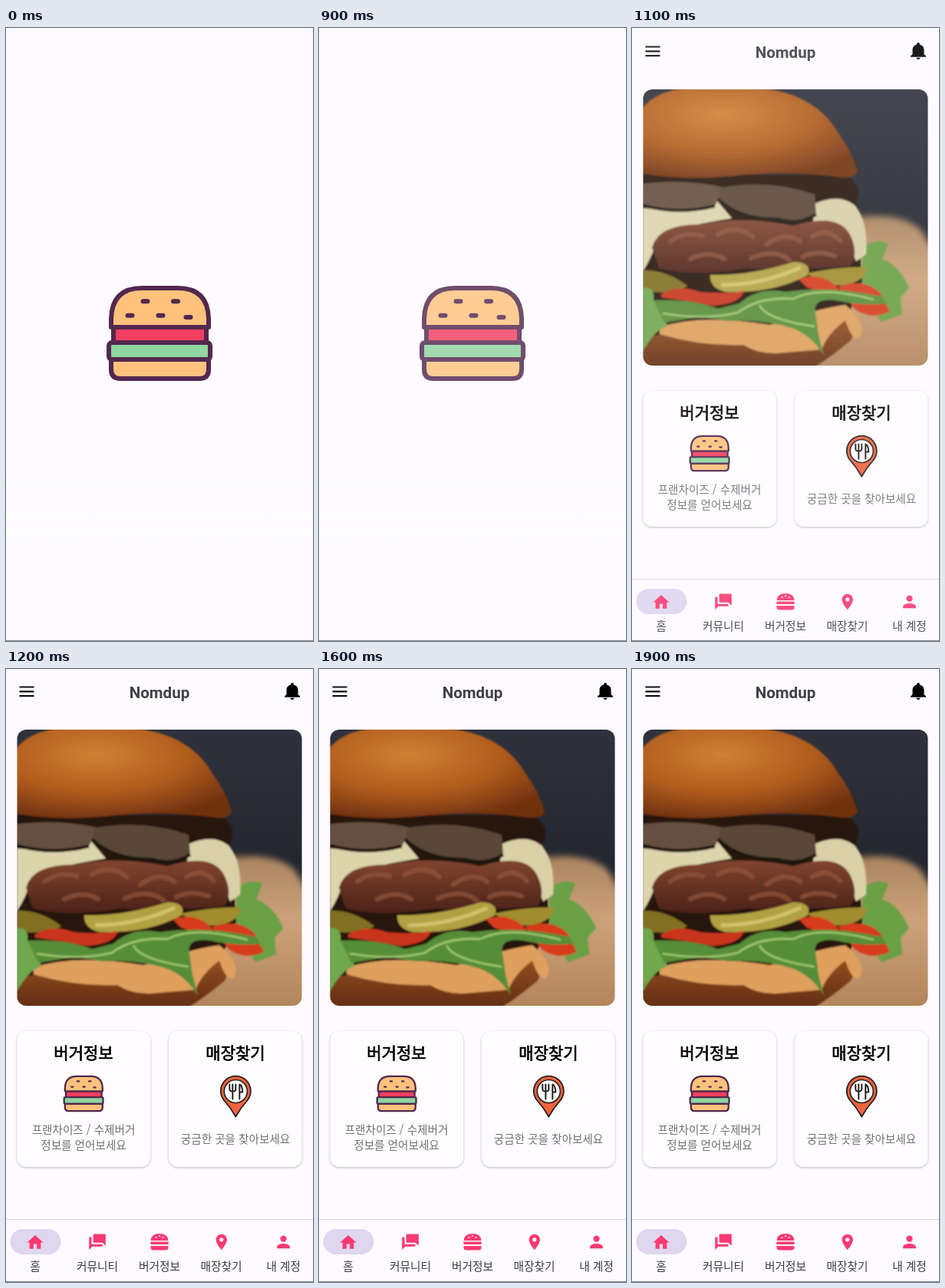
An HTML page without scripts for the animation above (2000 ms loop, 400 by 799 pixels).

```html
<!DOCTYPE html>
<html lang="ko">
<head>
<meta charset="utf-8">
<title>Burger app launch</title>
<style>
  html, body { margin: 0; width: 100%; height: 100%; overflow: hidden; background: #fdfbff; }
  svg { display: block; }
  .stage { width: 100vw; height: 100vh; }
  text { font-family: "Noto Sans CJK KR", "Noto Sans CJK JP", "Noto Sans CJK", sans-serif; text-anchor: middle; }
  .brand { font: 700 20.5px Roboto, sans-serif; fill: #414043; }
  .heading { font-size: 21px; fill: #000; stroke: #000; stroke-width: .7; }
  .note { font-size: 14.6px; fill: #727074; }
  .label { font-size: 14.7px; fill: #3d3b40; }
  .card { fill: #fffdff; filter: drop-shadow(0 1.5px 1.5px rgba(0, 0, 0, .27)); }
  .pink { fill: #f93a72; }

  .splash { animation: splash 2s step-end infinite; }
  .home { animation: home 2s step-end infinite; }
  .veil { animation: veil 2s step-end infinite; }
  @keyframes splash {
    0% { opacity: 1; }
    45% { opacity: .82; }
    50%, 100% { opacity: 0; }
  }
  @keyframes home {
    0% { opacity: 0; transform: translateY(4px); }
    50% { opacity: .57; transform: translateY(3.5px); }
    55% { opacity: .9; transform: translateY(1px); }
    60%, 100% { opacity: 1; transform: none; }
  }
  @keyframes veil {
    0% { opacity: 1; }
    55%, 100% { opacity: 0; }
  }
</style>
</head>
<body>
<svg class="stage" viewBox="0 0 400 799" preserveAspectRatio="none">
  <defs>
    <g id="burger" stroke="#52284e" stroke-width="6" stroke-linejoin="round" stroke-linecap="round">
      <path d="M140 390H261V410H140Z" fill="#f23f5f"/>
      <path d="M137 390V379Q138 339 177 339H224Q263 339 264 379V390Z" fill="#ffc27d"/>
      <path d="M137 432V445Q137 457 149 457H252Q264 457 264 445V432Z" fill="#ffc27d"/>
      <rect x="134" y="410" width="132" height="22" rx="4" fill="#8fd6a1"/>
      <path d="M178.500 356.300h6M218 356.300h6M158.500 374.800h6M198.500 374.800h6M234.500 377h6"/>
    </g>
    <linearGradient id="night" x2="0" y2="1">
      <stop stop-color="#2f323d"/><stop offset=".5" stop-color="#23262f"/>
    </linearGradient>
    <linearGradient id="board" x2="0" y2="1">
      <stop stop-color="#a98460"/><stop offset=".4" stop-color="#cda27a"/><stop offset="1" stop-color="#b08259"/>
    </linearGradient>
    <radialGradient id="bun" cx=".4" cy=".3" r=".75">
      <stop stop-color="#d08136"/><stop offset=".55" stop-color="#b05c1d"/><stop offset="1" stop-color="#6f300f"/>
    </radialGradient>
    <linearGradient id="heel" x2="0" y2="1">
      <stop stop-color="#9a5424"/><stop offset="1" stop-color="#5f2b10"/>
    </linearGradient>
    <linearGradient id="meat" x2="0" y2="1">
      <stop stop-color="#81452f"/><stop offset="1" stop-color="#4c2218"/>
    </linearGradient>
    <linearGradient id="fade" x2="0" y2="1">
      <stop stop-color="#fdfbff" stop-opacity="0"/><stop offset="1" stop-color="#fdfbff"/>
    </linearGradient>
    <filter id="soft"><feGaussianBlur stdDeviation="4"/></filter>
    <filter id="smooth"><feGaussianBlur stdDeviation=".8"/></filter>
    <clipPath id="frame"><rect x="14.500" y="79" width="371" height="360" rx="12"/></clipPath>
  </defs>

  <rect width="400" height="799" fill="#fdfbff"/>
  <use class="splash" href="#burger"/>

  <g class="home">
    <path d="M17.500 23.500h19M17.500 29.300h19M17.500 35.100h19" stroke="#111" stroke-width="2.200"/>
    <text class="brand" x="200" y="37.500">Nomdup</text>
    <path transform="translate(358 15.200) scale(1.250 1.130)" d="M12 22c1.100 0 2-.9 2-2h-4c0 1.100.9 2 2 2zm6-6v-5c0-3.100-1.600-5.600-4.500-6.300V4c0-.8-.7-1.500-1.500-1.500s-1.500.7-1.500 1.500v.7C7.600 5.400 6 7.900 6 11v5l-2 2v1h16v-1z"/>

    <!-- Hero picture, back to front -->
    <g clip-path="url(#frame)">
      <rect x="14" y="79" width="372" height="360" fill="url(#night)"/>
      <path d="M290 246Q350 238 376 262L400 300V450H200V300Z" fill="url(#board)" filter="url(#soft)"/>
      <g filter="url(#smooth)">
        <path d="M300 285Q320 272 334 280L326 300Q350 310 361 338L350 350 352 372 325 382 300 345Z" fill="#69a044"/>
        <path d="M14 190H280Q302 208 292 225L300 330 270 400H14Z" fill="#251611"/>
        <path d="M0 130Q14 76 90 76H150Q236 79 269 136Q287 160 294 186Q290 197 268 193Q200 184 130 192Q60 199 0 186Z" fill="url(#bun)"/>
        <path d="M14 234Q75 238 108 221L130 247Q70 256 35 270Q25 300 14 316Z" fill="#dcd4aa"/>
        <path d="M238 228Q270 214 290 230Q308 250 305 294L292 303 275 260 236 252Z" fill="#d9d0a8"/>
        <path d="M26 285Q35 254 90 255Q145 243 210 257Q270 238 285 270Q296 295 284 309Q200 316 150 312Q80 324 35 312Z" fill="url(#meat)"/>
        <path d="M50 277q18-14 42-7M112 268q25-14 45 3M175 281q24-18 44-4M235 271q20-13 36 5M76 300q25-12 44 0M155 299q30-13 50 2M222 297q20-9 42-1" fill="none" stroke="#985b42" stroke-width="6" stroke-linecap="round" opacity=".6"/>
        <path d="M14 202Q70 195 120 207L108 231Q60 243 14 230Z" fill="#655040"/>
        <path d="M116 207Q180 196 238 216L240 242Q215 257 190 248Q140 249 112 222Z" fill="#5a4739"/>
        <path d="M14 230Q60 243 108 231M112 222Q140 249 190 248Q215 257 240 242" fill="none" stroke="#1d1511" stroke-width="4"/>
        <path d="M14 315Q45 314 72 335L60 344 14 343Z" fill="#817024"/>
        <path d="M102 321Q155 322 210 304Q235 304 229 321Q185 345 122 343Q101 338 102 321Z" fill="#b2a143"/>
        <path d="M226 319Q275 309 307 311Q300 337 260 334Z" fill="#a18c2f"/>
        <path d="M116 334Q170 334 220 311" fill="none" stroke="#d0c36c" stroke-width="5"/>
        <path d="M14 403Q65 390 160 402Q245 385 280 369Q298 388 284 407Q250 435 230 445H14Z" fill="url(#heel)"/>
        <path d="M36 389Q90 371 180 386Q240 365 278 360Q307 384 297 402Q288 410 278 380Q255 397 247 418Q210 421 188 423Q165 424 145 412Q90 414 36 398Z" fill="#dfa05d"/>
        <path d="M38 346Q60 332 88 343Q120 346 146 342Q140 359 105 361Q75 355 38 350Z" fill="#c9351a"/>
        <path d="M217 326Q250 315 272 342L268 351 228 337ZM268 336Q305 324 324 345L336 369Q310 380 290 365Z" fill="#d63b1b"/>
        <path d="M14 338Q30 336 28 354Q48 365 45 388Q30 392 14 420Z" fill="#70a84d"/>
        <path d="M28 354Q80 352 112 365L140 358Q165 336 200 343Q260 334 325 349L332 358Q300 362 267 354Q235 350 239 370L243 398 250 426Q235 400 208 390Q170 378 125 381L91 375 42 383Z" fill="#568d38"/>
        <path d="M40 371Q95 380 138 370Q165 349 210 352Q245 334 315 353M166 360Q174 379 238 388" fill="none" stroke="#a1c76f" stroke-width="2.500"/>
      </g>
    </g>

    <rect class="card" x="14.500" y="472" width="173.500" height="177" rx="12"/>
    <rect class="card" x="212" y="472" width="173.500" height="177" rx="12"/>
    <text class="heading" x="101" y="508">버거정보</text>
    <text class="heading" x="299" y="508">매장찾기</text>
    <use href="#burger" transform="translate(101.300 553.500) scale(.385) translate(-200.500 -398)"/>
    <text class="note" x="101" y="605.500">프랜차이즈 / 수제버거</text>
    <text class="note" x="101" y="626">정보를 얻어보세요</text>
    <text class="note" x="299" y="618">궁금한 곳을 찾아보세요</text>

    <g transform="translate(299.300 550.500)" stroke="#24201f" stroke-linecap="round" stroke-linejoin="round">
      <path d="M0 33Q-6 22-15 12A19.500 19.500 0 1 1 15 12Q6 22 0 33Z" fill="#f0633e" stroke-width="1.800"/>
      <circle r="15" fill="#fff" stroke-width="1.600"/>
      <path d="M-8-9v6q0 3 4 3t4-3v-6M-4-9V10" fill="none" stroke-width="2"/>
      <path d="M5 10V-9Q9-7 9 1H5" fill="#fff" stroke-width="2"/>
    </g>

    <path d="M0 717.500H400" stroke="#dcd9df"/>
    <rect x="5.500" y="730" width="66" height="33" rx="16.500" fill="#dfd6ef"/>
    <g class="pink">
      <path transform="translate(25.400 734.800) scale(1.050)" d="M10 20v-6h4v6h5v-8h3L12 3 2 12h3v8z"/>
      <path transform="translate(132 734.500) scale(-1.080 1.020)" d="M21 6h-2v9H6v2c0 .6.4 1 1 1h11l4 4V7c0-.6-.4-1-1-1zm-4 6V3c0-.6-.4-1-1-1H3c-.6 0-1 .4-1 1v14l4-4h10c.6 0 1-.4 1-1z"/>
      <path d="M188.500 745Q189 736 200 736T211.500 745Z"/>
      <rect x="188" y="746.500" width="24" height="3.600" rx="1.800"/>
      <path d="M188.500 752H211.500V754Q211.500 757.500 208 757.500H192Q188.500 757.500 188.500 754Z"/>
      <path transform="translate(268.400 734.600) scale(1.030)" d="M12 2C8.100 2 5 5.100 5 9c0 5.200 7 13 7 13s7-7.800 7-13c0-3.900-3.100-7-7-7zm0 9.500a2.500 2.500 0 0 1 0-5 2.500 2.500 0 0 1 0 5z"/>
      <path transform="translate(348.900 734.200) scale(1.050)" d="M12 12a4 4 0 0 0 0-8 4 4 0 0 0 0 8zm0 2c-2.700 0-8 1.300-8 4v2h16v-2c0-2.700-5.300-4-8-4z"/>
    </g>
    <path d="M195 741h1M199.500 739h1M204 741h1" stroke="#fdfbff" stroke-width="1.300" stroke-linecap="round"/>
    <text class="label" x="38" y="783.500">홈</text>
    <text class="label" x="119" y="783.500">커뮤니티</text>
    <text class="label" x="200" y="783.500">버거정보</text>
    <text class="label" x="280.500" y="783.500">매장찾기</text>
    <text class="label" x="361.500" y="783.500">내 계정</text>
  </g>

  <g class="veil">
    <rect y="570" width="400" height="100" fill="url(#fade)"/>
    <rect y="670" width="400" height="129" fill="#fdfbff"/>
  </g>
  <path d="M0 798.500H400" stroke="#858387"/>
</svg>
</body>
</html>
```
